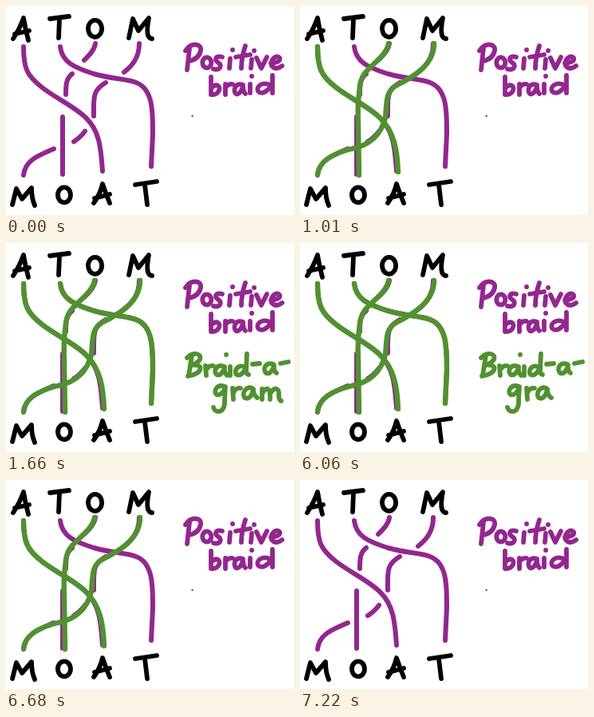
Recreate the animation shown at these times as an HTML page. Size 361x262 px, loop 8 s.

```html
<!DOCTYPE html>
<html lang="en">
<head>
<meta charset="utf-8">
<title>ATOM to MOAT braid</title>
<style>
html, body { margin: 0; width: 100%; height: 100%; overflow: hidden; background: #fff; }
svg { display: block; width: 361px; height: 262px; }
path { fill: none; stroke-linecap: round; stroke-linejoin: round; }
.ink { stroke: #000; stroke-width: 5.8; }
.strand { stroke: #93268f; stroke-width: 6; }
.label { stroke: #93268f; stroke-width: 5.8; }
.pen { stroke: #509130; stroke-width: 6.4; }
.note { stroke: #509130; stroke-width: 5.8; }
.speck { stroke: #666; stroke-width: 2.4; }
</style>
</head>
<body>
<svg id="stage" viewBox="0 0 361 262" role="img" aria-label="ATOM, MOAT, Positive braid, Braid-a-gram"></svg>
<script>
const stage = document.getElementById('stage');

function draw(cls, d) {
  const path = document.createElementNS('http://www.w3.org/2000/svg', 'path');
  path.setAttribute('class', cls);
  path.setAttribute('d', d);
  path.setAttribute('pathLength', 1);
  stage.append(path);
  return path;
}

const ring = (x, y, rx, ry) =>
  `M${x + rx * .3} ${y - ry}a${rx} ${ry} 0 1 0 1 .3`;

// Words ATOM and MOAT
[
  'M9 41Q17 29 22 15Q24 28 28 43M11 35L29 31',
  'M55 16L79 13M67 16L66 40',
  ring(110.5, 28.5, 8.5, 10.5),
  'M154 40L159 16L166 31L179 15Q176 30 178 37Q180 41 183 41',
  'M8 249L13 229L20 242L32 228Q32 241 36 250',
  ring(72, 237, 8, 9.5),
  'M110 247Q118 236 121 223Q125 235 130 247M111 241L130 236',
  'M162 224L189 220M174 224L177 249'
].forEach(d => draw('ink', d));

// Braid strands with gaps at the crossings
const strandT = 'M68 51C70 70 85 77 110 85C135 92 150 91 163 96C185 104 184 135 184 160L182 201';
[
  'M22 51C22 78 26 87 45 102C63 116 86 126 100 140C118 157 119 180 121 207',
  strandT,
  'M112 47C111 55 105 61 98 68M83 85C75 91 75 100 75 111M71 139L71 211',
  'M167 47C167 65 158 75 148 83M125 96C108 106 110 115 110 138M99 157Q93 165 85 170M60 179C40 188 24 193 22 212'
].forEach(d => draw('strand', d));

// "Positive braid"
[
  'M230 53L227 80M225 56C232 45 246 47 244 56C242 65 235 68 229 69',
  ring(251, 71, 5.5, 6.5),
  'M271 64C263 62 260 67 266 71C272 75 268 81 260 79',
  'M281 66L280 78M284 55h.1',
  'M300 50Q295 65 295 78M288 64L306 61',
  'M308 67L307 78M311 56h.1',
  'M314 65L320 78L327 64',
  'M332 72Q345 70 343 65C339 60 331 67 333 75Q338 81 346 75',
  'M257 89L257 111M257 103C264 96 269 100 267 106Q264 112 257 111',
  'M275 98L275 111M275 103Q278 97 284 98',
  'M297 99C288 95 284 105 288 110C292 112 296 106 297 100Q297 107 300 110',
  'M306 98L306 109M308 88h.1',
  'M331 99C320 94 313 102 316 107C321 112 329 106 332 100M334 87L334 109'
].forEach(d => draw('label', d));

draw('speck', 'M233.5 138h.2');

// Each pen stroke takes a number of steps
let total = 0;
const strokes = [
  ['pen', 5, 'M22 51C22 78 27 88 45 102C63 116 86 126 100 140C118 157 122 180 123 208'],
  ['pen', 2, 'M111 47C109 62 88 74 80 86C74 95 75 103 74 110'],
  ['pen', 2, 'M74 110Q72 125 73 150L74 212'],
  ['pen', 9, 'M22 211C24 195 40 185 65 179C90 174 102 160 107 140C109 120 107 108 120 100C140 90 168 75 168 47'],
  ['pen', 5, strandT],
  ['note', 1, 'M233 141L229 166'],
  ['note', 1, 'M227 144C234 136 246 138 243 146Q240 151 232 153C249 151 247 164 228 167'],
  ['note', 1, 'M250 154L251 166M251 159Q254 153 260 154'],
  ['note', 1, 'M273 155C265 151 259 160 264 165C269 167 273 161 274 155Q273 162 277 166'],
  ['note', 1, 'M281 155L281 166'],
  ['note', 1, 'M276 140h.1'],
  ['note', 1, 'M300 156C291 151 285 160 289 165C295 168 299 160 301 156M302 139L301 160Q301 164 304 165'],
  ['note', 1, 'M309 152L318 151'],
  ['note', 1, 'M335 152C326 148 321 158 326 163C331 165 335 159 336 153Q335 160 339 163'],
  ['note', 1, 'M344 151L354 149'],
  ['note', 1, 'M274 180C265 176 259 186 264 190C269 192 274 185 275 180Q274 193 274 202C272 214 262 213 260 206'],
  ['note', 1, 'M284 182L285 196M285 188Q288 181 294 182'],
  ['note', 1, 'M310 183C302 177 295 188 299 194C305 197 309 190 310 183Q310 191 315 194'],
  ['note', 1, 'M321 183L321 196M321 189C326 179 332 181 331 196M331 189C337 178 343 183 342 191Q342 197 345 198']
].map(([cls, steps, d]) => {
  const stroke = { path: draw(cls, d), start: total, steps };
  total += steps;
  return stroke;
});

const ticks = (t, start, gap, max) =>
  Math.max(0, Math.min(max, Math.floor((t - start) / gap) + 1));

// Steps visible at time t: written in two runs, then undone
const stepsAt = t =>
  ticks(t, 500, 30, 26) + ticks(t, 1320, 34, 11) -
  ticks(t, 6060, 33.3, 25) - ticks(t, 6890, 30, 12);

function render(now) {
  const done = stepsAt(Math.max(0, now - begin) % 8000);
  for (const { path, start, steps } of strokes) {
    const part = Math.min(1, (done - start) / steps);
    path.style.display = part > 0 ? '' : 'none';
    path.style.strokeDasharray = part < 1 ? `${Math.max(0, part)} 2` : 'none';
  }
  requestAnimationFrame(render);
}

const begin = performance.now();
render(begin);
</script>
</body>
</html>
```
